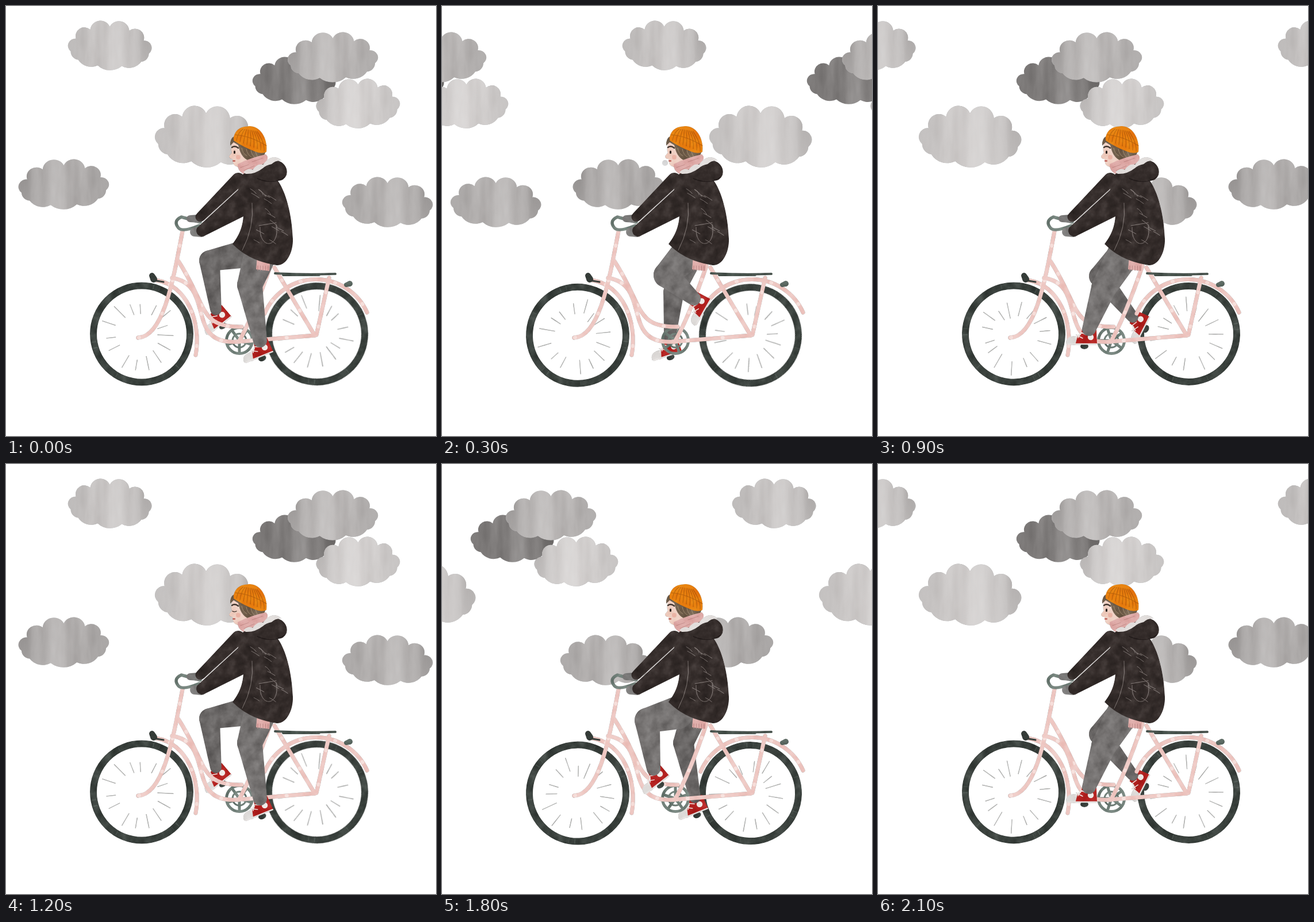
Animation, 748 px wide and 748 px high, one loop 2400 ms. Source, as an HTML page:

```html
<!DOCTYPE html>
<html lang="en">
<head>
<meta charset="utf-8">
<title>Cyclist under clouds</title>
<style>
html, body { margin: 0; width: 100%; height: 100%; overflow: hidden; background: #fff; }
svg { display: block; width: 100vw; height: 100vh; }
path { stroke-linecap: round; stroke-linejoin: round; }
</style>
</head>
<body>
<svg viewBox="0 0 748 748">
  <defs id="defs">
    <filter id="wash" x="0" y="0" width="1" height="1" color-interpolation-filters="sRGB">
      <feTurbulence type="fractalNoise" baseFrequency=".04 .008" numOctaves="4" seed="4"/>
      <feColorMatrix values=".45 0 0 0 .275 .45 0 0 0 .275 .45 0 0 0 .275 0 0 0 0 1"/>
      <feBlend mode="soft-light" in2="SourceGraphic"/>
      <feComposite operator="in" in2="SourceAlpha"/>
    </filter>
    <filter id="grain" filterUnits="userSpaceOnUse" x="130" y="190" width="520" height="490" color-interpolation-filters="sRGB">
      <feTurbulence type="fractalNoise" baseFrequency=".06" numOctaves="4" seed="9"/>
      <feColorMatrix values=".45 0 0 0 .275 .45 0 0 0 .275 .45 0 0 0 .275 0 0 0 0 1"/>
      <feBlend mode="soft-light" in2="SourceGraphic"/>
      <feComposite operator="in" in2="SourceAlpha"/>
    </filter>
  </defs>
  <g id="sky"></g>
  <g id="ride" filter="url(#grain)"></g>
</svg>
<script>
const $ = id => document.getElementById(id);
const PINK = '#eec8c3', TYRE = '#39403c', GREEN = '#6f7e77', COAT = '#342c2a',
      NEAR = '#757271', FAR = '#696665';

const fill = (d, color) => `<path d="${d}" fill="${color}"/>`;
const line = (d, color, w, extra = '') =>
  `<path d="${d}" fill="none" stroke="${color}" stroke-width="${w}" ${extra}/>`;
const disc = (x, y, r, color) => `<circle cx="${x}" cy="${y}" r="${r}" fill="${color}"/>`;
const loop = (n, make) => Array.from({ length: n }, (_, i) => make(i)).join('');
const tube = d => line(d, PINK, 7) + line(d, '#f6dfdb', 6, 'stroke-dasharray="1 60" stroke-dashoffset="-25"');

function random(seed) {
  return () => (seed = seed * 16807 % 2147483647) / 2147483647;
}

// Limb part with round ends of different radii.
function taper([ax, ay], ra, [bx, by], rb, color) {
  const len = Math.hypot(bx - ax, by - ay), nx = (by - ay) / len, ny = (ax - bx) / len;
  return fill(`M${ax + nx * ra} ${ay + ny * ra}L${bx + nx * rb} ${by + ny * rb}` +
    `A${rb} ${rb} 0 0 1 ${bx - nx * rb} ${by - ny * rb}L${ax - nx * ra} ${ay - ny * ra}` +
    `A${ra} ${ra} 0 0 1 ${ax + nx * ra} ${ay + ny * ra}Z`, color);
}

// Cloud outline in a 147 by 87 box: six high puffs over five shallow ones.
function puffs() {
  let d = '', px, py;
  for (let i = 0; i <= 11; i++) {
    const top = i <= 6, a = Math.PI * (top ? 1 + i / 6 : 2 + (i - 6) / 5);
    const x = 73.5 + 68 * Math.cos(a);
    const y = 56 + (top ? 45 : 24) * Math.sin(a) + 0.03 * (x - 73.5);
    const r = Math.hypot(x - px, y - py) * (top ? 0.52 : 0.75);
    d += i ? `A${r} ${r} 0 0 1 ${x} ${y}` : `M${x} ${y}`;
    [px, py] = [x, y];
  }
  return d;
}
const CLOUD = puffs();

// Left, top, width, height, lightness, mirrored.
const clouds = [
  [107, 25, 147, 87, 200, 0],
  [258, 173, 180, 108, 206, 0],
  [428, 88, 146, 83, 132, 0],
  [489, 45, 159, 88, 186, 1],
  [539, 126, 147, 87, 210, 1],
  [21, 266, 159, 88, 178, 1],
  [584, 297, 159, 88, 182, 0]
];
$('defs').innerHTML += clouds.map((c, i) => `<linearGradient id="tone${i}">` + loop(5, j => {
  const v = c[4] + 6 - 24 * (j / 2 - 1) ** 2;
  return `<stop offset="${j / 4}" stop-color="rgb(${v},${v - 3},${v - 4})"/>`;
}) + '</linearGradient>').join('');

function sky(k) {
  const span = 776, drift = k && 15 + 191 * k;
  return clouds.map(([x, y, w, h, , flip], i) => [0, -span].map(shift => {
    const left = (x + drift) % span + shift, s = w / 147;
    const place = flip ? `${left + w} ${y}) scale(${-s}` : `${left} ${y}) scale(${s}`;
    return `<g transform="translate(${place} ${h / 87})"><path d="${CLOUD}" fill="url(#tone${i})" filter="url(#wash)"/></g>`;
  }).join('')).join('');
}

function wheel(x, y, r, turn) {
  const rnd = random(7);
  const spokes = loop(15, i => {
    const from = 28 + rnd() * 22, to = from + 14 + rnd() * 14;
    return `<path d="M${from} 0H${to}" stroke="#b5b6b4" stroke-width="1.3" transform="rotate(${i * 24 + rnd() * 10})"/>`;
  });
  return `<g transform="translate(${x} ${y}) rotate(${turn})">${spokes}
    <circle r="${r}" fill="none" stroke="${TYRE}" stroke-width="12"/>
    <circle r="${r}" fill="none" stroke="#5e6862" stroke-width="8" stroke-dasharray="1 60 2 9 1 104" opacity=".5"/></g>`;
}

function chainring(turn) {
  const arms = loop(5, i => `<path d="M0 5V19" stroke="${GREEN}" stroke-width="5" transform="rotate(${i * 72 + turn})"/>`);
  return `<g transform="translate(406 582)"><circle r="22.5" fill="none" stroke="${GREEN}" stroke-width="5"/>
    <circle r="12" fill="none" stroke="${GREEN}" stroke-width="3"/>${arms}</g>`;
}

// Knee, ankle and foot tilt at each quarter turn of the pedals.
const poses = {
  near: [[424, 485, 442, 582, -22], [390, 468, 438, 509, -60], [357, 446, 368, 530, -38], [393, 490, 367, 562, 0]],
  far: [[354, 443, 365, 528, -38], [403, 498, 396, 580, -18], [420, 485, 440, 580, -22], [385, 470, 443, 541, -63]]
};

function shoe(x, y, tilt) {
  return `<g transform="translate(${x} ${y}) rotate(${tilt})">` +
    `<ellipse cx="-8" cy="30" rx="7" ry="5" fill="${TYRE}"/>` +
    fill('M-12 0L13 0L14 26L-28 26Q-28 15 -14 10Z', '#b3211f') +
    fill('M-20 13Q-40 10 -40 25L-24 28Z', '#dddad8') +
    line('M-37 26L13 26', '#e6e2e0', 2.4) +
    line('M-17 10L-24 16M-13 6L-19 15M-22 10L-11 16M-13 6L-5 10', '#eee7e4', 1.5) +
    disc(3, 14, 5.2, '#eee9e6') + '</g>';
}

function leg(side, k) {
  const [kx, ky, ax, ay, tilt] = poses[side][k];
  const [size, color] = side == 'near' ? [1.1, NEAR] : [0.9, FAR];
  return shoe(ax, ay, tilt) +
    taper([230 + kx / 2, 433], 26 * size, [kx, ky], 20 * size, color) +
    taper([kx, ky], 20 * size, [ax, ay], 11 * size, color);
}

const frame = [
  'M261 477C315 485 340 550 330 607', 'M450 535A97 97 0 0 1 628 533',
  'M307 392C292 470 275 575 230 577', 'M300 444C350 520 335 560 410 558',
  'M289 473C365 485 310 590 402 584', 'M402 584L537 573',
  'M460 452Q430 540 405 584', 'M467 455Q505 520 537 573', 'M562 473L540 572'
].map(tube).join('') +
  line('M468 465Q520 468 573 466M482 468H545', '#46514b', 4) +
  taper([592, 485], 4, [598, 483], 5, '#5b6962') +
  taper([254, 469], 5, [257, 475], 6, TYRE) + line('M262 478L274 480', TYRE, 3);

const bars = line('M338 376L305 367Q290 374 300 386Q307 394 336 382', GREEN, 5.5);

// Pale scratches scattered over the jacket.
function scratches() {
  const rnd = random(23);
  return line(loop(16, () => `M${425 + rnd() * 55} ${315 + rnd() * 115}q6 3 ${8 + rnd() * 6} ${4 + rnd() * 8}`), '#857c79', 1);
}

const body =
  taper([320, 370], 6, [334, 370], 7, '#7a7978') +
  taper([404, 302], 12, [338, 367], 8.5, COAT) +
  taper([328, 393], 8, [340, 393], 9, '#807f7e') +
  fill('M437 435L435 458L458 461L460 440Z', '#dea9a6') +
  line(loop(5, i => `M${438 + i * 4.5} 452v8`), '#b98583', 1) +
  fill('M400 305C418 282 445 275 466 268C482 268 492 282 488 294Q484 304 473 304' +
    'C491 330 498 375 499 405C500 428 488 452 471 451C440 446 415 435 394 414C403 402 414 385 413 355Z', COAT) +
  taper([428, 331], 25, [341, 391], 10, COAT) +
  line('M437 300Q465 312 484 298', '#201a19', 1.5) +
  line('M428 343Q432 385 411 425M440 382L470 377M442 385C440 425 478 422 470 380M404 318L345 372', '#857c79', 1) +
  scratches();

const face = fill('M396 232Q389 248 393 255L388 261Q388 266 394 266L395 273Q397 281 410 280L435 262L430 235Z', '#efcfc2') +
  fill('M398 226Q389 230 390 243L396 237L404 242Q408 262 420 268L448 263L453 250Z', '#6d5b48') +
  line(loop(4, i => `M${410 + i * 8} ${247 + i * 2}q2 10 9 14`), '#a08a6f', 1) +
  fill('M403 275Q425 264 452 258Q462 268 440 279L413 292Q402 286 403 275Z', '#dfaca9') +
  line('M408 281l14 -5M414 286l18 -8M428 271l18 -6', '#c48f8c', 1) +
  fill('M413 289q8 -8 16 -4q8 -12 18 -9q8 -11 18 -13q10 0 14 6q-10 -1 -17 6q-10 2 -15 7q-14 11 -30 10Z', '#e2deDC') +
  line('M393 246Q398 242 404 247', '#3b302a', 2.4) +
  disc(404, 263, 4, '#eab3a4') +
  line('M395 269.500h3', '#b4473f', 2);

const hat = fill('M396 228C400 212 412 209 425 209C446 210 456 236 453 254Q444 258 433 253Q414 246 396 234Z', '#e8810f') +
  line('M399 224Q425 226 453 243', '#b9620b', 1.2) +
  line(loop(9, i => {
    const x = 401 + i * 6, y = 234 + i * 2.4;
    return `M${x} ${y}Q${x + 2} ${y - 14} ${x * 0.5 + 212} ${214 + i * 0.5}`;
  }), '#b9620b', 1.1);

function draw(step) {
  const k = step % 4, c = Math.cos(k * Math.PI / 2), s = Math.sin(k * Math.PI / 2);
  const y = 571.6 - c + 1.2 * s;
  const eye = line(step == 4 ? 'M394 256Q397 258 401 256' : 'M397.500 253v2.500', '#30251f', step == 4 ? 1.2 : 3);
  const breath = k == 1 ? disc(388, 273, 5, '#d9dadb88') : '';
  $('sky').innerHTML = sky(k);
  $('ride').innerHTML = wheel(236, y, 84, -k * 35) + wheel(538.5 + 2 * c - 2 * s, y, 83.5, 50 - k * 35) +
    leg('far', k) + chainring(-k * 90) + frame + leg('near', k) + bars + body + face + eye + hat + breath;
}

let shown = -1;
function tick() {
  const step = Math.floor(performance.now() % 2400 / 300);
  if (step != shown) draw(shown = step);
  requestAnimationFrame(tick);
}
tick();
</script>
</body>
</html>
```
